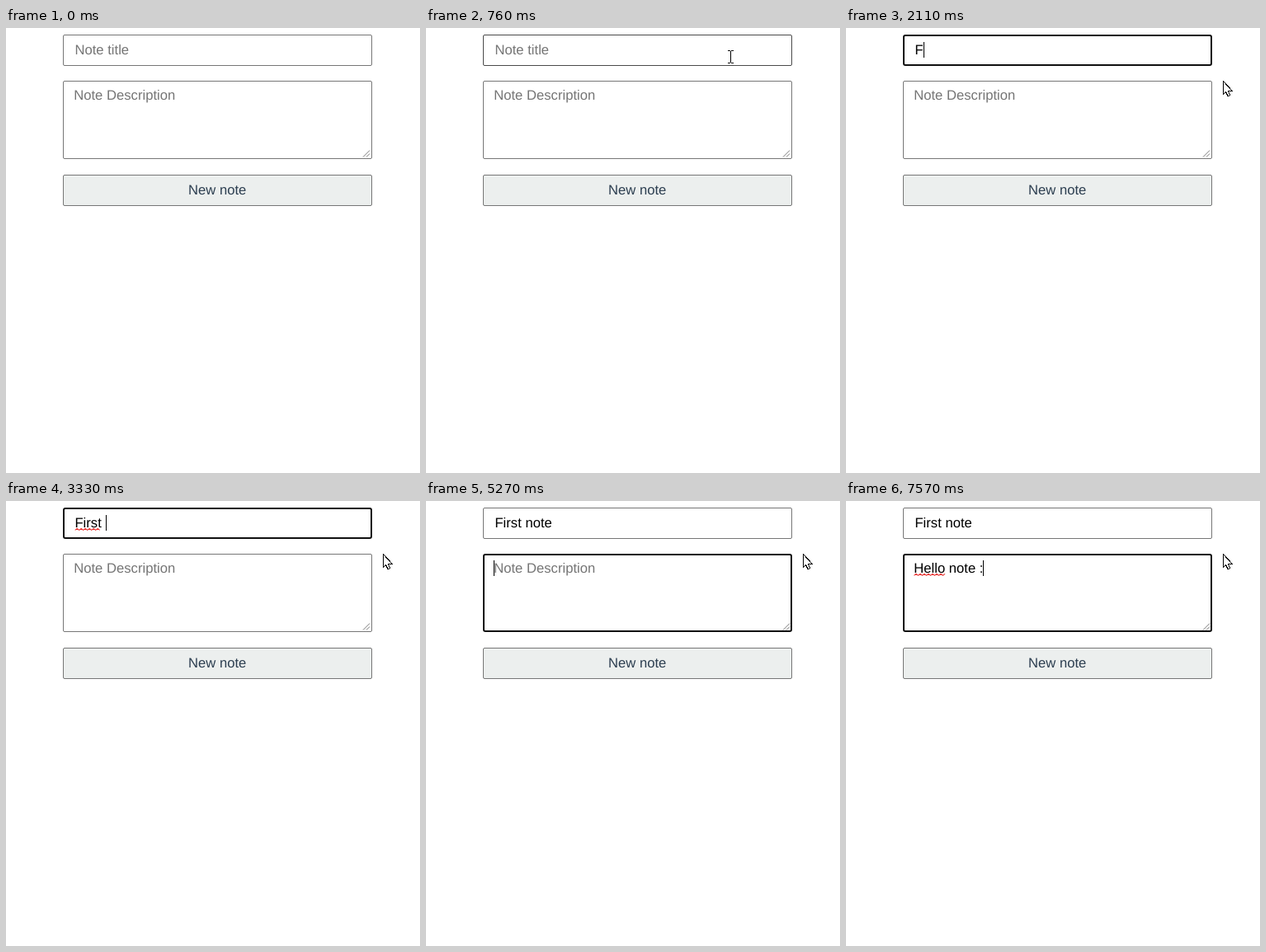
These frames come from a looping animation (502 by 540 pixels, 8 s). An HTML page:

```html
<!DOCTYPE html>
<html lang="en">
<head>
<meta charset="utf-8">
<title>Note form</title>
<style>
  html, body { margin: 0; width: 100%; height: 100%; overflow: hidden; background: #fff; }
  svg { display: block; }
  text {
    font: 16.667px "Liberation Sans", Arial, sans-serif;
    text-rendering: geometricPrecision;
    white-space: pre;
  }
</style>
</head>
<body>
<svg id="stage" width="502" height="540" viewBox="0 0 502 540"></svg>
<script>
const LOOP = 8000, BLINK = 530;
const LEFT = 69, RIGHT = 444;
const stage = document.getElementById('stage');

function set(el, attrs) {
  for (const key in attrs) el.setAttribute(key, attrs[key]);
  return el;
}
function add(tag, attrs) {
  return stage.appendChild(set(document.createElementNS('http://www.w3.org/2000/svg', tag), attrs));
}
function show(el, on) {
  el.setAttribute('visibility', on ? 'visible' : 'hidden');
}

// Progress from 0 to 1 between two times
const span = (t, from, to) => Math.min(1, Math.max(0, (t - from) / (to - from)));
const easeOut = k => 1 - (1 - k) ** 3;
const mix = (a, b, k) => a + (b - a) * k;

// Spelling underline: a small wave of period 5
function wave(x, y, width) {
  let d = `M${x} ${y + 1}`;
  for (let i = 1; i * 2.5 <= width; i++) d += `L${x + i * 2.5} ${y + (i % 2 ? -1 : 1)}`;
  return d;
}

// Each run is typed at an even pace between the times of its first and last key
const fields = [
  {
    textX: 83.4, caretX: 83.5, top: 17, box: [8, 46], hint: 'Note title',
    runs: [
      { text: 'First', from: 2110, to: 2820 },
      { text: ' ', from: 3330, to: 3330 },
      { text: 'note', from: 3630, to: 3900 }
    ],
    focus: 860, blur: 4200
  },
  {
    textX: 82.2, caretX: 81.5, top: 72, box: [64, 159], hint: 'Note Description',
    runs: [
      { text: 'Hello', from: 5340, to: 6150 },
      { text: ' ', from: 6510, to: 6510 },
      { text: 'note', from: 6670, to: 6910 },
      { text: ' :', from: 7210, to: 7570 }
    ],
    focus: 4200, blur: LOOP
  }
];
const button = { box: [178, 216] };

for (const f of fields) {
  f.frame = add('rect', { fill: '#fff' });
  f.text = add('text', { x: f.textX, y: f.top + 15 });
  f.text.textContent = f.runs[0].text;
  f.wave = add('path', {
    d: wave(f.textX + 0.3, f.top + 17.4, f.text.getComputedTextLength()),
    fill: 'none', stroke: '#e8312f', 'stroke-width': 1.1, 'stroke-linejoin': 'round'
  });
  f.caret = add('rect', { y: f.top, width: 1, height: 19, fill: '#000' });
}
add('path', { d: 'M433 156.5L441 148.5M437 156.5L441 152.5', stroke: '#777' });
button.frame = add('rect', {});
add('text', { x: 256.2, y: 202, fill: '#2c3e50', 'text-anchor': 'middle' }).textContent = 'New note';

const arrow = add('path', {
  d: 'M.5 .5V16.5L3.5 13.5L6 18.5H7.5L8.5 17L6.5 12.5H11.5Z',
  fill: '#fff', stroke: '#000', 'shape-rendering': 'crispEdges'
});
const beam = add('path', {
  d: 'M-3 -7.5H0M1 -7.5H4M.5 -7V7M-3 7.5H0M1 7.5H4', fill: 'none', stroke: '#000'
});

// The pointer curves up to the title, leaves to the right, then nudges aside
function pointerAt(t) {
  const enter = easeOut(span(t, 30, 760));
  const leave = easeOut(span(t, 900, 1250));
  const curve = (a, b, c) => mix(mix(a, b, enter), mix(b, c, enter), enter);
  const x = curve(466, 444, 369) + 86 * leave + 2 * span(t, 1410, 1510);
  const y = curve(519, 301, 35) + 29 * leave;
  return [Math.round(x), Math.round(y)];
}

function typing(f, t) {
  let typed = '', last = f.focus;
  for (const { text, from, to } of f.runs) {
    if (t < from) break;
    const step = (to - from) / Math.max(1, text.length - 1);
    const index = Math.round(span(t, from, to) * (text.length - 1) - 0.499);
    typed += text.slice(0, index + 1);
    last = from + index * step;
  }
  return { typed, last };
}

function drawBox(item, hover, focused) {
  const [top, bottom] = item.box, line = focused ? 2 : 1;
  set(item.frame, {
    x: LEFT + line / 2, y: top + line / 2,
    width: RIGHT - LEFT - line, height: bottom - top - line,
    rx: 1 + line / 2, 'stroke-width': line,
    stroke: focused ? '#101010' : hover ? '#4a4a4a' : '#767676'
  });
}

function drawField(f, t, hover) {
  const focused = t >= f.focus && t < f.blur;
  const { typed, last } = typing(f, t);
  drawBox(f, hover, focused);

  f.text.textContent = typed || f.hint;
  f.text.setAttribute('fill', typed ? '#000' : '#757575');
  show(f.wave, focused && typed.includes(' '));

  const width = typed ? f.text.getComputedTextLength() : 0;
  f.caret.setAttribute('x', Math.round(f.caretX + width));
  show(f.caret, focused && Math.floor((t - last) / BLINK) % 2 === 0);
}

function draw(t) {
  const [px, py] = pointerAt(t);
  const visible = t >= 30;
  const over = ({ box: [top, bottom] }) =>
    visible && px >= LEFT && px < RIGHT && py >= top && py < bottom;

  fields.forEach(f => drawField(f, t, over(f)));
  drawBox(button, over(button), false);
  button.frame.setAttribute('fill', over(button) ? '#e5e5e5' : '#ecefee');

  const editing = fields.some(over);
  for (const el of [arrow, beam]) set(el, { transform: `translate(${px} ${py})` });
  show(arrow, visible && !editing);
  show(beam, visible && editing);
}

const start = performance.now();
function tick() {
  draw((performance.now() - start) % LOOP);
  requestAnimationFrame(tick);
}
tick();
</script>
</body>
</html>
```
